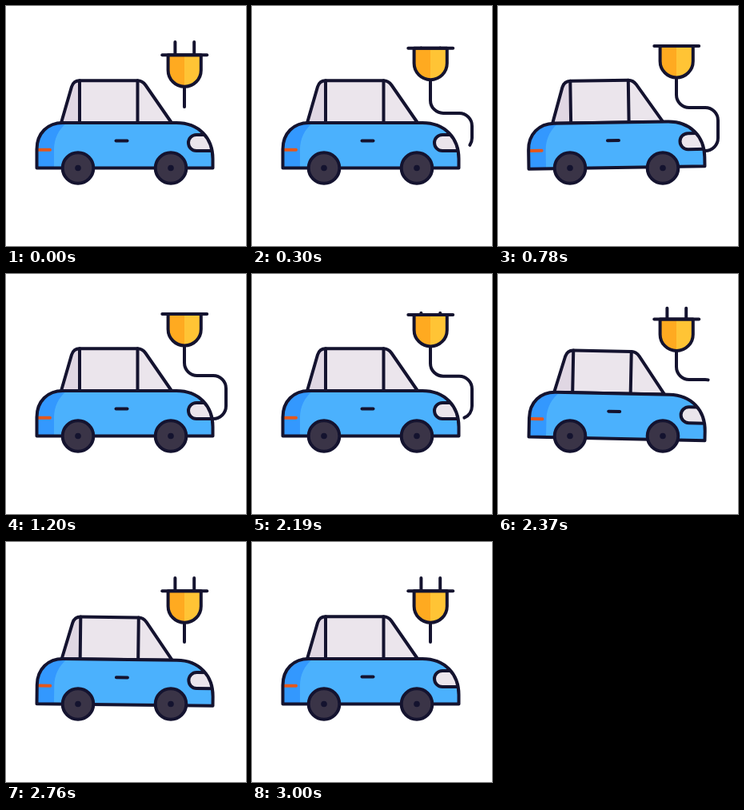
Write an HTML page with a canvas that moves like this. It is 300x300 px and loops after 5090 ms.

```html
<!DOCTYPE html>
<html lang="en">
<head>
<meta charset="utf-8">
<title>Electric car charging</title>
<style>
  html, body { margin: 0; width: 100%; height: 100%; overflow: hidden; background: #fff; }
  canvas { display: block; width: 100vw; height: 100vh; }
</style>
</head>
<body>
<canvas id="stage"></canvas>
<script>
const LOOP = 5090, STEP = 30, SIZE = 300;
const INK = '#14132f', GLASS = '#ebe5ec', GLASS_DARK = '#e0d7e3';
const BLUE = '#4bb1fd', BLUE_DARK = '#3398fe', RED = '#e4571c';
const GOLD = '#ffc435', GOLD_DARK = '#ffaa20', TYRE = '#3a3447';

const canvas = document.getElementById('stage');
const ctx = canvas.getContext('2d');

const clamp = v => Math.min(1, Math.max(0, v));
const span = (t, a, b) => clamp((t - a) / (b - a));
const sineOut = p => Math.sin(p * Math.PI / 2);
const sineInOut = p => (1 - Math.cos(p * Math.PI)) / 2;
const mix = (a, b, p) => a + (b - a) * p;

// Suspension bounce: [ms, value] extremes joined by sine easing
const LIFT = [[390, 0], [550, 3.4], [715, -1], [900, 1.1], [1060, -0.3], [1200, 0]];
const TILT = [[390, 0], [550, 1.2], [780, -0.9], [960, 0.8], [1100, -0.25], [1200, 0]];

function track(keys, t) {
  if (t <= keys[0][0]) return keys[0][1];
  for (let i = 1; i < keys.length; i++) {
    const [a, va] = keys[i - 1], [b, vb] = keys[i];
    if (t < b) return mix(va, vb, sineInOut(span(t, a, b)));
  }
  return keys[keys.length - 1][1];
}

function pose(t) {
  const out = t >= 2160;
  const s = out ? t - 2160 : t;
  const dir = p => out ? 1 - p : p;
  const bounce = out ? t - 1830 : t;
  const live = t < 3000 ? 1 : 0;
  return {
    bar: mix(61.3, 50, dir(sineOut(span(s, 0, 540)))),
    prong: mix(16.3, 0, dir(sineOut(span(s, 0, 330)))),
    cable: dir(out ? span(s, 0, 350) : sineInOut(span(s, -30, 420))),
    sag: mix(14, 0, dir(span(s, 0, 590))),
    lift: live * track(LIFT, bounce),
    tilt: live * track(TILT, bounce)
  };
}

function shape(d, fill, stroke) {
  const p = typeof d === 'string' ? new Path2D(d) : d;
  if (fill) { ctx.fillStyle = fill; ctx.fill(p); }
  if (stroke) { ctx.strokeStyle = stroke; ctx.stroke(p); }
}

function clipped(d, draw) {
  ctx.save();
  ctx.clip(new Path2D(d));
  draw();
  ctx.restore();
}

function disc(x, y, r, fill, stroke) {
  const p = new Path2D();
  p.arc(x, y, r, 0, Math.PI * 2);
  shape(p, fill, stroke);
}

const BODY = 'M38.5 202.5V179C38.5 159 52 146 71 146H213C241 146 258.5 165 258.5 191V202.5Z';
const CABIN = 'M69 146L82 101Q84.5 93.3 92 93.3H164.5Q170.5 93.3 174.5 99L207 146Z';

function drawCar({ lift, tilt }) {
  ctx.save();
  ctx.translate(148, 202.5 + lift);
  ctx.rotate(tilt * Math.PI / 180);
  ctx.translate(-148, -202.5);

  shape(CABIN, GLASS);
  clipped(CABIN, () => shape('M60 90H92V150H60Z', GLASS_DARK));
  shape(CABIN, null, INK);
  shape('M92 93.3V146M164.5 93.3V146', null, INK);

  shape(BODY, BLUE);
  clipped(BODY, () => {
    shape('M30 140H84C68 150 60 163 60 180V210H30Z', BLUE_DARK);
    shape('M280 181H238A10 10 0 0 1 238 161H280Z', GLASS, INK);
  });
  shape('M41 179.8H55', null, RED);
  shape(BODY, null, INK);
  shape('M137.5 168.5H151.5', null, INK);
  ctx.restore();
}

function drawCable({ bar, cable, sag }) {
  const top = bar + 39.5, y = 127 + sag;
  const bend = 16, arc = bend * Math.PI / 2;
  const down = 165 - (y + bend);
  const total = (y - bend - top) + 20 + down + 3 * arc + 3;
  ctx.save();
  ctx.setLineDash([mix(24.2, total, cable), 1000]);
  shape(`M223 ${top}V${y - bend}a16 16 0 0 0 16 16h20a16 16 0 0 1 16 16V165a16 16 0 0 1 -16 16h-3`, null, INK);
  ctx.restore();
}

function drawPlug({ bar, prong }) {
  ctx.save();
  ctx.translate(0, bar);
  for (const x of [211.4, 235.2]) shape(`M${x} 0V${-prong - 0.01}`, null, INK);
  const head = 'M202.6 0H243.8V18.9A20.6 20.6 0 0 1 202.6 18.9Z';
  shape(head, GOLD);
  clipped(head, () => shape('M200 0H223V42H200Z', GOLD_DARK));
  shape(head, null, INK);
  shape('M195.3 0H251.2', null, INK);
  ctx.restore();
}

function render(t) {
  const state = pose(t);
  const w = canvas.clientWidth, h = canvas.clientHeight;
  const dpr = window.devicePixelRatio || 1;
  const pw = Math.round(w * dpr), ph = Math.round(h * dpr);
  if (canvas.width !== pw || canvas.height !== ph) {
    canvas.width = pw;
    canvas.height = ph;
  }
  ctx.setTransform(pw / SIZE, 0, 0, ph / SIZE, 0, 0);
  ctx.fillStyle = '#fff';
  ctx.fillRect(0, 0, SIZE, SIZE);
  ctx.lineWidth = 4;
  ctx.lineCap = ctx.lineJoin = 'round';

  drawCable(state);
  drawPlug(state);
  drawCar(state);
  for (const x of [90, 206]) {
    disc(x, 202.5, 19.3, TYRE, INK);
    disc(x, 202.5, 3.8, INK);
  }
}

const start = performance.now();
function tick() {
  const t = (performance.now() - start) % LOOP;
  render(Math.floor(t / STEP) * STEP);
  requestAnimationFrame(tick);
}
tick();
</script>
</body>
</html>
```
